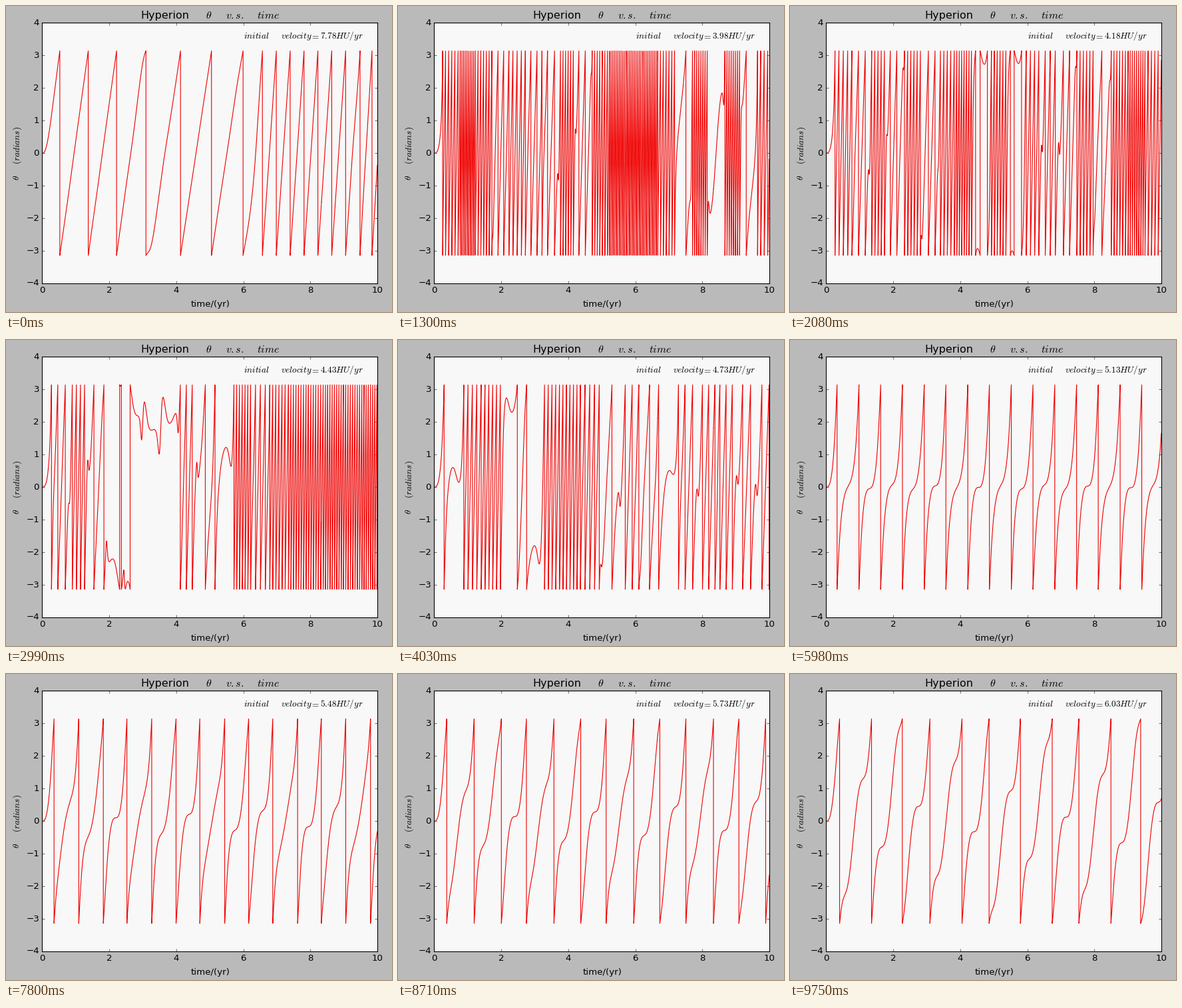
These frames come from a looping animation (580x460 px, 9.88 s). A matplotlib script:

```python
import numpy as np
import matplotlib.pyplot as plt
from matplotlib.animation import FuncAnimation

W, H, DPI = 580, 460, 80
FRAMES, INTERVAL = 76, 130
DT, STEPS = 1e-4, 100_000
LOWEST, HIGHEST, SPACING, RUNS = 3.78, 7.78, 0.05, 46

plt.rcParams.update({
    "font.family": "DejaVu Sans", "font.size": 12, "mathtext.fontset": "cm",
    "axes.linewidth": 1, "agg.path.chunksize": 20000,
    "xtick.direction": "in", "ytick.direction": "in",
    "xtick.top": True, "ytick.right": True,
    "xtick.major.size": 4, "ytick.major.size": 4,
    "xtick.major.width": 0.5, "ytick.major.width": 0.5,
    "xtick.major.pad": 4, "ytick.major.pad": 4, "ytick.alignment": "center",
})


def tumble(speeds):
    """Euler-Cromer spin angle of a dumbbell moon, one column per launch speed."""
    pos = np.ones(len(speeds), complex)
    vel = 1j * speeds
    theta, omega = np.zeros(len(speeds)), np.zeros(len(speeds))
    history = np.zeros((STEPS + 1, len(speeds)))
    pull, torque = 4 * np.pi**2 * DT, 12 * np.pi**2 * DT
    for step in range(1, STEPS + 1):
        r = np.abs(pos)
        r2 = r * r
        r3 = r2 * r
        body = pos * np.exp(-1j * theta)
        omega += torque * body.real * body.imag / (r3 * r2)
        vel -= pull * pos / r3
        theta += omega * DT
        pos += vel * DT
        history[step] = theta
    return (history + np.pi) % (2 * np.pi) - np.pi


def run_index(frame):
    """Which launch speed is on show; the sweep pauses twice."""
    if frame < 5:
        return RUNS
    if frame < 39:
        active = min(frame, 34) - 5
    elif frame < 60:
        active = min(frame, 55) - 9
    else:
        active = frame - 13
    return int(active * 8 / 11 + 0.45)


speeds = np.append(LOWEST + SPACING * np.arange(RUNS), HIGHEST)
angles = tumble(speeds)
times = np.arange(STEPS + 1) * DT

fig = plt.figure(figsize=(W / DPI, H / DPI), dpi=DPI, facecolor="#bababa")
ax = fig.add_axes([54.5 / W, 1 - 417 / H, 503.5 / W, 391.7 / H], facecolor="#f8f8f8")
ax.set(xlim=(0, 10), ylim=(-4, 4), xticks=range(0, 11, 2), yticks=range(-4, 5))


def label(x, y, text, size=12, **style):
    return fig.text(x / W, 1 - y / H, text, fontsize=size, va="baseline", **style)


for x, text in [(202.2, "Hyperion"), (300, r"$\theta$"), (330, "$v.s.$"), (376.6, "$time$")]:
    label(x, 19.3, text, 14.4)
for y, text in [(262.3, r"$\theta$"), (238, "$(radians)$")]:
    label(20.5, y, text, rotation=90, rotation_mode="anchor")
label(306.8, 452, "time/(yr)", ha="center")
for x, text in [(357, "$initial$"), (413.2, "$velocity$"), (457.4, "$=$")]:
    label(x, 49.3, text)
speed_text = label(471.6, 49.3, "")
curve, = ax.plot([], [], color="#f00000", lw=1)


def draw(frame):
    run = run_index(frame)
    curve.set_data(times, angles[:, run])
    speed_text.set_text(f"${speeds[run]:.2f}HU/yr$")
    return curve, speed_text


anim = FuncAnimation(fig, draw, frames=FRAMES, interval=INTERVAL, repeat=True, repeat_delay=0)
plt.show()
```
